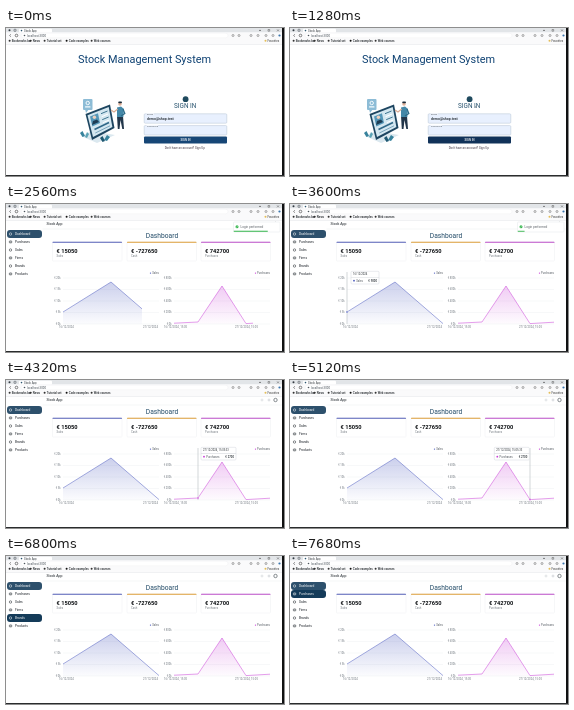
Write an HTML page with a canvas that moves like this. It is 278x148 px and loops after 8 s.

```html
<!DOCTYPE html>
<html lang="en">
<head>
<meta charset="utf-8">
<title>Stock dashboard</title>
<style>
html, body { margin: 0; width: 100%; height: 100%; overflow: hidden; background: #fff; }
canvas { display: block; width: 278px; height: 148px; }
</style>
</head>
<body>
<canvas id="stage"></canvas>
<script>
const W = 278, H = 148, LOOP = 8000;
const canvas = document.getElementById('stage');
const ctx = canvas.getContext('2d');
const dpr = window.devicePixelRatio || 1;
canvas.width = W * dpr;
canvas.height = H * dpr;

const INK = '#11181e', NAVY = '#0f4273', GREY = '#767d84';
const clamp = v => Math.max(0, Math.min(1, v));
const ramp = (t, from, to) => clamp((t - from) / (to - from));
const mix = (a, b, k) => `rgb(${a.map((v, i) => Math.round(v + (b[i] - v) * k))})`;

// CSS "ease", solved by bisection
function ease(x) {
  let lo = 0, hi = 1;
  for (let i = 0; i < 20; i++) {
    const m = (lo + hi) / 2, n = 1 - m;
    if (0.75 * n * n * m + 0.75 * n * m * m + m * m * m < x) lo = m; else hi = m;
  }
  const n = 1 - lo;
  return 0.3 * n * n * lo + 3 * n * lo * lo + lo * lo * lo;
}

function rect(x, y, w, h, fill, r = 0, stroke, line = 0.5) {
  ctx.beginPath();
  ctx.roundRect(x, y, w, h, r);
  if (fill) { ctx.fillStyle = fill; ctx.fill(); }
  if (stroke) { ctx.strokeStyle = stroke; ctx.lineWidth = line; ctx.stroke(); }
}

function dot(x, y, r, fill, stroke, line = 0.6) {
  ctx.beginPath();
  ctx.arc(x, y, r, 0, Math.PI * 2);
  if (fill) { ctx.fillStyle = fill; ctx.fill(); }
  if (stroke) { ctx.strokeStyle = stroke; ctx.lineWidth = line; ctx.stroke(); }
}

function path(pts, fill, stroke, line = 0.6) {
  ctx.beginPath();
  pts.forEach(([x, y], i) => i ? ctx.lineTo(x, y) : ctx.moveTo(x, y));
  if (fill) { ctx.closePath(); ctx.fillStyle = fill; ctx.fill(); }
  if (stroke) { ctx.strokeStyle = stroke; ctx.lineWidth = line; ctx.stroke(); }
}

function text(str, x, y, size, color = INK, align = 'left', weight = 400) {
  ctx.font = `${weight} ${size}px Roboto, sans-serif`;
  ctx.textAlign = align;
  ctx.fillStyle = color;
  ctx.fillText(str, x, y);
}

function browser() {
  rect(0, 0, W, 4.5, '#e2e5e8');
  rect(13, 0.7, 33, 4, '#fff', 1);
  dot(3.5, 2.3, 1, '#333b42');
  rect(8, 1.3, 2, 2, null, 0.3, '#333b42');
  dot(15.5, 2.6, 0.8, '#2d5670');
  text('Stock App', 18, 3.6, 2.8, '#33393f');
  path([[253, 2.4], [255, 2.4]], null, '#333');
  rect(262, 1.5, 1.7, 1.7, null, 0, '#333', 0.4);
  path([[271, 1.4], [273, 3.4]], null, '#333', 0.4);
  path([[273, 1.4], [271, 3.4]], null, '#333', 0.4);

  rect(0, 4.5, W, 12, '#fafafb');
  rect(15, 5.2, 207, 4.6, '#fff', 2.2, '#eceef0', 0.4);
  path([[5, 6.2], [3.5, 7.5], [5, 8.8]], null, '#333', 0.5);
  dot(10.5, 7.5, 1.3, null, '#333', 0.6);
  dot(18.5, 7.5, 0.8, '#4a525a');
  text('localhost:3000', 21, 8.6, 2.9, '#4a525a');
  [227, 233, 245, 252, 260, 267].forEach(x => dot(x, 7.5, 1, null, '#555', 0.5));
  dot(273.5, 7.5, 1.1, '#3975ad');

  const marks = [[3, '#333', 'Bookmarks bar'], [24, '#333', 'News'], [38, '#333', 'Tutorial set'],
    [60, '#111', 'Code examples'], [85, '#333', 'Web courses']];
  for (const [x, color, label] of marks) {
    dot(x + 0.6, 12.7, 1, color);
    text(label, x + 2.8, 13.7, 2.9, '#1d2226', 'left', 500);
  }
  dot(259.5, 12.7, 1, '#e4bd57');
  text('Favorites', 261.5, 13.7, 2.9, '#333');
  rect(0, 16, W, 0.4, '#e6e8ea');
}

function frameEdge() {
  rect(276, 0, 2, H, '#101112');
  rect(0, 147, W, 1, '#2a2c2e');
}

function leaf(x, y, dx, color) {
  path([[x, y], [x + dx, y - 5], [x + dx * 2, y - 3], [x + dx, y + 1]], color);
}

function illustration() {
  rect(77, 71, 9.5, 11, '#8dbcd6', 1);
  path([[79, 81], [80, 85], [83, 81]], '#8dbcd6');
  dot(81.7, 75, 1.7, null, '#f4fafd', 1);
  rect(79, 78.3, 5.5, 1.2, '#f4fafd', 0.5);
  path([[75, 108], [86, 103], [109, 107], [91, 115]], '#dbe8ef');
  // tilted screen
  path([[79.5, 86], [104, 76.5], [108.5, 100], [86, 112]], '#1d4560');
  path([[81.5, 87.3], [102.7, 79], [106.4, 99], [87, 109]], '#d4e7f0');
  path([[84, 88.5], [92, 85.3], [94, 95], [86.3, 98.5]], '#5597b8');
  dot(88.4, 89.3, 1.7, '#ecd0bf');
  path([[86, 97], [87, 93], [91, 91.6], [93, 94]], '#1e3d54');
  for (let i = 0; i < 4; i++) {
    path([[95 + i * 0.6, 85.7 + i * 3], [101.5 + i * 0.6, 83 + i * 3]], null, i % 2 ? '#fff' : '#3e7590', 1);
  }
  path([[88.5, 101.5], [103, 94.5]], null, '#2f6787', 1.6);
  path([[89.3, 105], [104, 97.8]], null, '#7ba6bd', 1);
  leaf(79, 108, -2.5, '#37829c');
  leaf(79, 109, 2, '#5ba3b5');
  leaf(98, 112, 3, '#37829c');
  leaf(99, 113, -2.5, '#1f5872');
  // standing man
  path([[111, 88], [117, 88], [118, 101], [116.3, 101], [114.5, 92], [113.5, 101], [111.8, 101]], '#22364a');
  path([[111, 79.5], [115, 78.5], [118, 81], [117.3, 89], [111, 89]], '#4488a8');
  path([[111.7, 81], [108, 84], [105, 82]], null, '#d9ab92', 1.2);
  path([[117, 81], [118.8, 85.5], [115, 88]], null, '#2f6c89', 1.3);
  dot(114, 76, 1.8, '#e0b29a');
  rect(112.2, 73.4, 3.8, 1.8, '#1c2c3a', 0.9);
}

function field(y, label, value) {
  rect(138.2, y, 82.6, 9.4, '#e8f0fe', 1, '#b7c3d2', 0.5);
  rect(140.5, y - 0.6, label.length * 1.3 + 1, 1.5, '#f4f7fc');
  text(label, 141, y + 1.2, 2.5, '#4d5864');
  text(value, 141, y + 6, 3.5, INK, 'left', 500);
}

function login(t) {
  text('Stock Management System', 138.5, 35, 10.9, NAVY, 'center');
  illustration();
  dot(179.6, 71.2, 2.9, '#1f4a5e');
  text('SIGN IN', 179.2, 80, 6.4, '#24506c', 'center');
  field(85.8, 'Email', 'demo@shop.test');
  field(97.6, 'Password', '');
  if (t >= 560 && t < 880 || t >= 1200) rect(185.3, 78.3, 0.5, 1.5, '#555');
  const settle = 0.25 * ramp(t, 80, 320);
  const hover = 0.75 * ramp(t, 1160, 1320);
  rect(138, 108.5, 83, 7, mix([22, 70, 118], [16, 46, 82], settle + hover), 1);
  text('SIGN IN', 179.5, 113, 2.8, '#fff', 'center', 500);
  text("Don't have an account? Sign Up", 178.7, 121.2, 2.9, '#3c333f', 'center');
}

const MENU = ['Dashboard', 'Purchases', 'Sales', 'Firms', 'Brands', 'Products'];
// item, pointer enters, pointer leaves
const HOVERS = [[5, 6640, 6720], [4, 6720, 6880], [3, 6880, 7020], [2, 7020, 7520], [1, 7520, 9000]];

function sidebar(t) {
  MENU.forEach((label, i) => {
    const y = 30 + i * 8;
    const span = HOVERS.find(h => h[0] === i);
    const glow = span ? ramp(t, span[1] - 30, span[1] + 60) * (1 - ramp(t, span[2], span[2] + 70)) : 0;
    if (i === 0) rect(1, 26, 35, 8, '#2d506c', 3);
    if (glow > 0) {
      ctx.globalAlpha = glow;
      rect(1, y - 4, 35, 8, '#143b59', 3);
      ctx.globalAlpha = 1;
    }
    const color = i === 0 ? '#fff' : mix([20, 26, 32], [255, 255, 255], glow);
    if (i % 2) {
      rect(3.4, y - 1.1, 2.3, 2, null, 0.4, color, 0.5);
      path([[3.6, y], [5.5, y]], null, color, 0.4);
    } else {
      dot(4.5, y, 1.2, null, color, 0.5);
    }
    text(label, 9, y + 1.1, 3.2, color);
  });
}

function header() {
  text('Stock App', 40.5, 21.2, 3.5, INK);
  rect(36.5, 24.8, 239.5, 0.4, '#eceef0');
  dot(256, 20, 1, null, '#c4c9ce', 0.5);
  dot(263, 20, 1, null, '#b5bbc0', 0.5);
  dot(269.5, 20, 1.7, null, '#3c444b', 0.6);
}

function card(x, color, value, label) {
  rect(x, 38, 69.5, 19, '#fff', 0.8, '#eceef0', 0.5);
  rect(x, 37.8, 69.5, 1, color, 0.4);
  text(value, x + 4, 48.5, 5.7, '#0c0f12', 'left', 700);
  text(label, x + 4, 53, 2.8, GREY);
}

const LEFT = {
  x: 57, step: 48, ys: [108, 78, 119.6], rgb: '76,91,190', name: 'Sales', tipW: 28,
  marks: ['20k', '15k', '10k', '5k', '0k'], dates: ['16/12/2024', '27/12/2024'], datesX: [53, 152],
  sum: '€ 9000'
};
const RIGHT = {
  x: 168, step: 24, ys: [119.2, 118, 82, 119.6, 118.2], rgb: '200,62,215', name: 'Purchases', tipW: 35,
  marks: ['800k', '600k', '400k', '200k', '0k'], dates: ['16/12/2024, 15:05', '27/12/2024, 15:05'], datesX: [158, 252],
  sum: '€ 2700'
};

function chart(c, t) {
  const end = c.x + 96, color = `rgb(${c.rgb})`;
  c.marks.forEach((m, i) => {
    const y = 74 + i * 11.5;
    rect(c.x, y - 0.15, 96, 0.3, '#eff1f3');
    text('€ ' + m, c.x - 2.5, y + 0.9, 2.6, GREY, 'right');
  });
  text(c.name, end, 70, 2.8, '#565d64', 'right');
  dot(end - (c === LEFT ? 8.5 : 14.5), 69.1, 0.7, color);
  text(c.dates[0], c.datesX[0], 124, 2.8, GREY);
  text(c.dates[1], c.datesX[1], 124, 2.8, GREY, 'right');

  const pts = c.ys.map((y, i) => [c.x + i * c.step, y]);
  const fill = ctx.createLinearGradient(0, 76, 0, 120);
  fill.addColorStop(0, `rgba(${c.rgb},0.3)`);
  fill.addColorStop(1, `rgba(${c.rgb},0.02)`);
  ctx.save();
  ctx.beginPath();
  ctx.rect(c.x - 0.5, 60, 97 * ease(ramp(t, 2095, 2995)), 62);
  ctx.clip();
  path([...pts, [end, 120], [c.x, 120]], fill);
  ctx.lineJoin = 'round';
  path(pts, null, color, 0.5);
  ctx.restore();
}

// chart, point, tooltip left edge, start, end
const TIPS = [
  [LEFT, 0, 61, 3440, 3760], [LEFT, 1, 108, 3760, 3920], [LEFT, 2, 122, 3920, 4080],
  [RIGHT, 0, 171, 4160, 4320], [RIGHT, 1, 195, 4320, 4560], [RIGHT, 2, 219, 4560, 5120],
  [RIGHT, 3, 204.3, 5120, 5840], [RIGHT, 2, 217, 5840, 5920], [RIGHT, 1, 195, 5920, 6000],
  [LEFT, 2, 122, 6000, 6080]
];

function tooltip(t) {
  const tip = TIPS.find(p => t >= p[3] && t < p[4]);
  if (!tip) return;
  const [c, i, x] = tip, px = c.x + i * c.step, color = `rgb(${c.rgb})`;
  rect(px - 0.25, 68, 0.5, 52, '#a9afb5');
  dot(px, c.ys[i], 1, color, '#fff', 0.4);
  rect(x, 67.3, c.tipW, 12.7, '#fff', 1, '#d3d7dc', 0.5);
  rect(x, 73, c.tipW, 0.4, '#cdd2d7');
  text(c === LEFT ? '16/12/2024' : '27/12/2024, 15:05:33', x + 2, 71.3, 2.7, '#33393f');
  dot(x + 3, 76.7, 0.9, color);
  text(c.name, x + 5.2, 77.7, 2.8, '#4d545b');
  text(c.sum, x + c.tipW - 2, 77.7, 2.8, '#2b3238', 'right', 500);
}

function toast(t) {
  if (t < 1920 || t >= 4080) return;
  const enter = 1 - Math.pow(1 - ramp(t, 1920, 2240), 3);
  const leave = Math.pow(ramp(t, 3840, 4080), 2);
  ctx.save();
  ctx.translate((1 - enter + leave) * 50, 0);
  rect(227.5, 18, 46.5, 10, '#fff', 0.8, '#e3e6e8', 0.5);
  dot(231, 22.8, 1.5, '#32b44a');
  path([[230.2, 22.8], [230.8, 23.4], [231.8, 22.2]], null, '#fff', 0.4);
  text('Login performed', 234.5, 23.9, 3.1, '#5a6066');
  rect(227.8, 26.8, 46 * (1 - ramp(t, 2100, 3860)), 0.9, '#32b44a');
  ctx.restore();
}

function dashboard(t) {
  header();
  sidebar(t);
  if (t < 2000) {
    text('Loading...', 40, 31.2, 3.2, INK);
  } else {
    text('Dashboard', 156, 34.3, 6.7, '#244c68', 'center');
    card(46.5, '#5560b8', '€ 15050', 'Sales');
    card(121, '#dd9f3a', '€ -727650', 'Cash');
    card(195, '#bd50c9', '€ 742700', 'Purchases');
    chart(LEFT, t);
    chart(RIGHT, t);
    tooltip(t);
  }
  toast(t);
}

function draw(now) {
  const t = now % LOOP;
  ctx.setTransform(dpr, 0, 0, dpr, 0, 0);
  rect(0, 0, W, H, '#fff');
  browser();
  if (t < 1600) login(t); else dashboard(t);
  frameEdge();
}

const start = performance.now();
function tick() {
  draw(performance.now() - start);
  requestAnimationFrame(tick);
}
tick();
</script>
</body>
</html>
```
